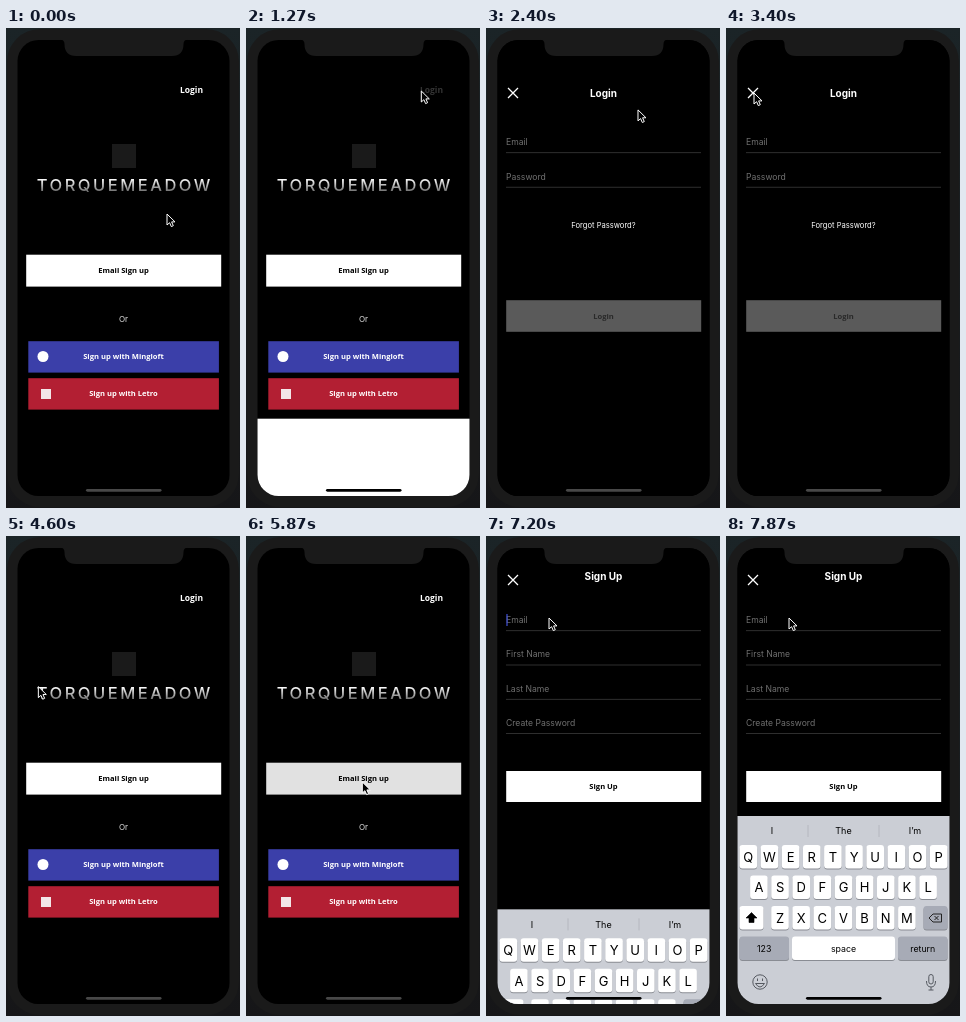
An HTML page for the animation above (8 s loop, 234 px wide and 480 px high).

```html
<!DOCTYPE html>
<html lang="en">
<head>
<meta charset="utf-8">
<title>Sign-in flow</title>
<style>
  html, body { margin: 0; width: 100%; height: 100%; overflow: hidden; background: #161a1c; }
  svg { display: block; width: 234px; height: 480px; }
  text { font-family: Inter, sans-serif; }
  .round { font-family: "Open Sans", sans-serif; font-weight: 700; }
</style>
</head>
<body>
<svg id="stage" viewBox="0 0 234 480"></svg>
<script>
const LOOP = 8000, SCREEN_H = 456, KEYS_H = 188;
const WHITE = '#fff', BLACK = '#000', GREY = '#a7abb6', DIM = '#484848';

// Markup helpers
const rect = (x, y, w, h, fill, more = '') =>
  `<rect x="${x}" y="${y}" width="${w}" height="${h}" fill="${fill}" ${more}/>`;
const text = (s, x, y, size, fill, more = '') =>
  `<text x="${x}" y="${y + size * .36}" font-size="${size}" fill="${fill}" text-anchor="middle" ${more}>${s}</text>`;
const label = (s, x, y, size, fill, more = '') => text(s, x, y, size, fill, 'class="round" ' + more);
const path = (d, stroke, width, fill = 'none') =>
  `<path d="${d}" stroke="${stroke}" stroke-width="${width}" fill="${fill}"/>`;
const group = (id, body) => `<g id="${id}">${body}</g>`;

const field = (name, y) =>
  `<text x="20" y="${y + 3}" font-size="8.6" fill="#707070">${name}</text>` +
  rect(20, y + 10.3, 195, .8, '#3a3a3a');
const header = (title, y, crossY) =>
  text(title, 117.5, y, 10, WHITE, 'font-weight="700"') +
  path(`M22 ${crossY - 5}l10 10m0-10l-10 10`, WHITE, 1.3);
const sheet = (id, body) => group(id, rect(11, 12, 213, SCREEN_H, BLACK) + body +
  rect(11, 12, 213, SCREEN_H, WHITE, 'class="blank"'));

const home =
  label('Login', 185.5, 62, 8.5, WHITE, 'id="loginLink"') +
  rect(106, 116, 24, 24, '#1a1a1a') +
  text('TORQUEMEADOW', 118.8, 157, 16.5, 'url(#silver)', 'font-weight="500" letter-spacing="2.5"') +
  group('emailButton', rect(20.2, 226.7, 195, 31.9, WHITE) + label('Email Sign up', 117.5, 242.5, 7.6, BLACK)) +
  text('Or', 117.5, 291.5, 8, '#ddd') +
  rect(22.3, 313.2, 190.6, 31.4, '#3b3fa9') +
  '<circle cx="37" cy="328.5" r="5.5" fill="#fff"/>' +
  label('Sign up with Mingloft', 117.5, 328.5, 7.6, WHITE) +
  rect(22.3, 350.2, 190.6, 31.4, '#b31f33') +
  rect(35, 361, 10, 10, '#f3e6e8') +
  label('Sign up with Letro', 117.5, 365.5, 7.6, WHITE);

const login = header('Login', 65, 65) + field('Email', 114) + field('Password', 148.5) +
  text('Forgot Password?', 117.5, 197.5, 7.6, WHITE) +
  rect(20.2, 272.2, 195, 31.6, '#5a5a5a') + label('Login', 117.5, 288, 7.6, '#2a2a2a');

const signup = header('Sign Up', 40.5, 44) +
  ['Email', 'First Name', 'Last Name', 'Create Password'].map((n, i) => field(n, 84 + i * 34.3)).join('') +
  rect(20.2, 235, 195, 31, WHITE) + label('Sign Up', 117.5, 250.5, 7.6, BLACK) +
  rect(20.4, 78, 1.2, 12, '#4050d8', 'id="caret"');

const key = (s, x, y, w, fill = WHITE, size = 13) =>
  rect(x, y + 1, w, 23.5, '#898c93', 'rx="3"') + rect(x, y, w, 23.5, fill, 'rx="3"') +
  text(s, x + w / 2, y + 12, size, BLACK);
const keyRow = (letters, x, y) =>
  [...letters].map((c, i) => key(c, x + i * 21.15, y, 17.6)).join('');
const keyboard =
  rect(11, 280, 213, KEYS_H, '#cbced5') +
  text('I', 46, 295, 9, BLACK) + text('The', 117.5, 295, 9, BLACK) + text('I’m', 189, 295, 9, BLACK) +
  path('M82 289v12M153 289v12', '#b0b3ba', .8) +
  keyRow('QWERTYUIOP', 13.5, 309) + keyRow('ASDFGHJKL', 24.1, 339.5) + keyRow('ZXCVBNM', 45.2, 370) +
  key('', 13.5, 370, 24) + path('M25.5 376.5l5.5 5.5h-3v4.5h-5v-4.5h-3z', BLACK, .6, BLACK) +
  key('', 197.5, 370, 24, GREY) + path('M207 378h8.5v8h-8.5l-4-4zM208.5 380l4 4m0-4l-4 4', '#222', 1) +
  key('123', 13.5, 400.5, 49.5, GREY, 8.8) + key('space', 66, 400.5, 103, WHITE, 8.8) +
  key('return', 172, 400.5, 49.5, GREY, 8.8) +
  '<circle cx="34" cy="446" r="7.2" fill="none" stroke="#555960"/>' +
  path('M31.5 442.5v2.5m5-2.5v2.5M29.5 447.5q4.5 7 9 0z', '#555960', 1) +
  rect(202.8, 438.5, 4.4, 9.5, 'none', 'rx="2.2" stroke="#555960"') +
  path('M200.5 445q0 6 4.5 6t4.5-6M205 451v3m-2.5 0h5', '#555960', 1);

document.getElementById('stage').innerHTML = `
  <defs>
    <clipPath id="screen"><rect x="11.5" y="12" width="212" height="${SCREEN_H}" rx="21"/></clipPath>
    <linearGradient id="silver" x2="0" y2="1">
      <stop offset=".2" stop-color="#fff"/><stop offset=".8" stop-color="#777"/>
    </linearGradient>
    <linearGradient id="desk" x2="0" y2="1">
      <stop stop-color="#1b2427"/><stop offset="1" stop-color="#161618"/>
    </linearGradient>
  </defs>
  ${rect(0, 0, 234, 480, 'url(#desk)')}
  ${rect(1, 1, 232, 478, '#1a1a1a', 'rx="33"')}
  <g clip-path="url(#screen)">
    ${rect(11, 12, 213, SCREEN_H, BLACK)}
    ${home}
    ${sheet('login', login)}
    ${sheet('signup', signup)}
    ${group('keyboard', keyboard)}
    ${rect(80, 460.9, 75.5, 2.9, DIM, 'rx="1.45" id="bar"')}
  </g>
  <path d="M54 11Q58.5 12 58.5 16Q58.5 28 70 28H166Q177.5 28 177.5 16Q177.5 12 182 11z" fill="#1a1a1a"/>
  ${group('cursor', path('M0 0V11L2.6 8.7L4.3 12.6L6.3 11.7L4.6 7.9H8z', WHITE, 1, BLACK))}`;

// Motion helpers
const clamp = v => Math.min(1, Math.max(0, v));
const smooth = v => (v = clamp(v), v * v * (3 - 2 * v));
// Critically damped spring: 1 at the start, settling to 0
const spring = (t, start) => {
  const x = Math.max(0, t - start) * .0176;
  return (1 + x) * Math.exp(-x);
};
const press = (t, start, end) => t < end ? 1 - .8 * smooth((t - start) / 150) : 1;

// Pointer stops: time, x, y
const stops = [
  [0, 161, 186], [50, 161, 186], [530, 175.3, 63], [1290, 175.3, 63], [1580, 173, 76],
  [2070, 178, 74], [2220, 178, 74], [2600, 122, 91], [3080, 44, 79], [3390, 28, 65],
  [4070, 28, 65], [4880, 34, 183], [5470, 116.3, 246], [5980, 116.3, 246],
  [6670, 71, 90], [6870, 63, 82], [LOOP, 63, 82]
];
function pointer(t) {
  const i = stops.findIndex(s => s[0] > t);
  const [t0, x0, y0] = stops[i - 1], [t1, x1, y1] = stops[i];
  const p = smooth((t - t0) / (t1 - t0));
  return [x0 + (x1 - x0) * p, y0 + (y1 - y0) * p];
}

const $ = id => document.getElementById(id);
const move = (id, x, y) => $(id).setAttribute('transform', `translate(${x} ${y})`);
const show = (el, on) => el.setAttribute('visibility', on ? 'visible' : 'hidden');

const OPEN_LOGIN = 1229, CLOSE_LOGIN = 4035, OPEN_SIGNUP = 5985, OPEN_KEYS = 7105, BLANK = 110;

function draw(t) {
  const blank = start => t >= start && t < start + BLANK;
  const loginDrop = t < CLOSE_LOGIN ? spring(t, OPEN_LOGIN) : 1 - spring(t, CLOSE_LOGIN);
  move('login', 0, SCREEN_H * loginDrop);
  move('signup', 0, SCREEN_H * spring(t, OPEN_SIGNUP));
  move('keyboard', 0, KEYS_H * spring(t, OPEN_KEYS));
  show($('login').querySelector('.blank'), blank(OPEN_LOGIN));
  show($('signup').querySelector('.blank'), blank(OPEN_SIGNUP));
  show($('caret'), t >= OPEN_KEYS && t < OPEN_KEYS + 560);
  $('loginLink').setAttribute('opacity', press(t, 980, 2000));
  $('emailButton').setAttribute('opacity', press(t, 5835, LOOP));
  const onLight = blank(OPEN_LOGIN) || blank(OPEN_SIGNUP) || t > OPEN_KEYS + 20;
  $('bar').setAttribute('fill', onLight ? BLACK : DIM);
  move('cursor', ...pointer(t));
}

function frame() {
  draw(performance.now() % LOOP);
  requestAnimationFrame(frame);
}
frame();
</script>
</body>
</html>
```
